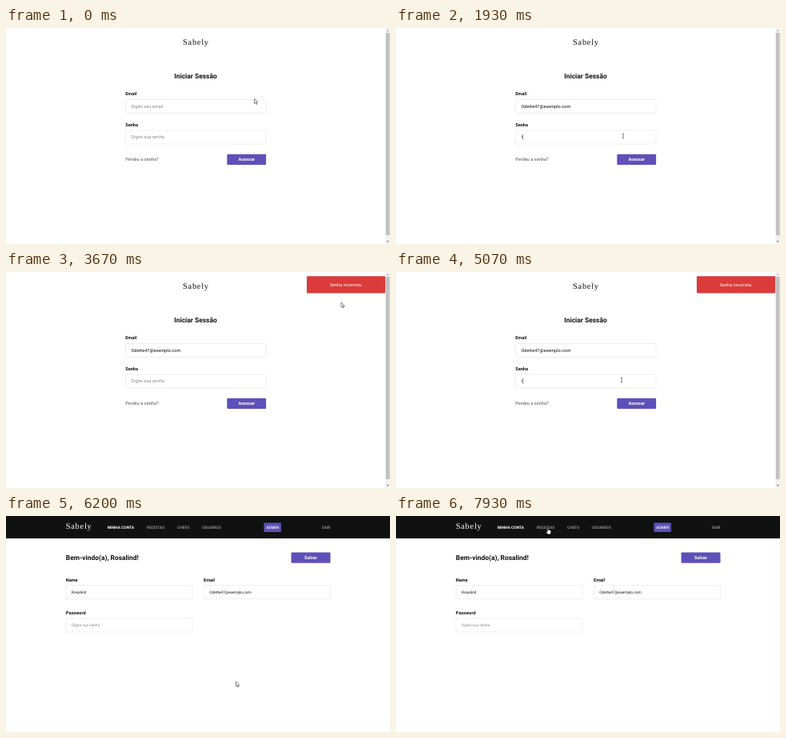
An HTML page that plays this animation: 480 by 270 pixels, repeating every 8000 ms.

```html
<!DOCTYPE html>
<html lang="pt-BR">
<head>
<meta charset="utf-8">
<title>Iniciar Sessão</title>
<style>
  html, body { margin: 0; width: 100%; height: 100%; overflow: hidden; background: #fff; }
  svg { display: block; width: 480px; height: 270px; }
  text { font: 5.62px Roboto, Arial, sans-serif; fill: #111; text-rendering: geometricPrecision; white-space: pre; }
  .title { font-size: 8.43px; font-weight: 700; }
  .bold { font-weight: 700; }
  .mid { text-anchor: middle; }
  .white { fill: #fff; }
  .hint { fill: #8a8a8a; }
  .nav { font-size: 4.92px; font-weight: 700; fill: #8d8d8d; }
  .nav.white { fill: #fff; }
  .small { font-size: 4.75px; }
  .logo { font: 10.4px "Liberation Serif", "Times New Roman", serif; letter-spacing: .75px; }
  .field { fill: #fff; stroke: #dcdcdc; stroke-width: .5; }
  .btn { fill: #5e50b9; }
  .btn.hover { fill: #796bd4; }
</style>
</head>
<body>
<svg viewBox="0 0 480 270">
  <g id="login">
    <text class="logo" x="221" y="21">Sabely</text>
    <text class="title mid" x="237" y="63">Iniciar Sessão</text>
    <text class="bold" x="149.2" y="84.4">Email</text>
    <rect class="field" x="149.5" y="89.5" width="175.5" height="17" rx="1.4"/>
    <text id="email" x="156.5" y="99.8"></text>
    <text class="bold" x="149.2" y="123.2">Senha</text>
    <rect class="field" x="149.5" y="128" width="175.5" height="17" rx="1.4"/>
    <text id="pass" x="156.5" y="138.4"></text>
    <rect id="caret" y="0" width=".5" height="6.6" fill="#111"/>
    <text x="149.2" y="166.2" style="fill:#777;font-weight:500">Perdeu a senha?</text>
    <rect id="enter" class="btn" x="276.3" y="157.8" width="48.8" height="13.2" rx="1.2"/>
    <text class="bold white mid" x="300.7" y="166.3">Acessar</text>
    <g id="toast">
      <rect x="375.6" y="5.4" width="99" height="21.8" rx="1.2" fill="#000" opacity=".15"/>
      <rect x="376" y="5.2" width="98.2" height="21" rx="1" fill="#db3b3b"/>
      <text class="white mid" x="425" y="17.8">Senha incorreta.</text>
    </g>
    <rect x="474.4" width="5.6" height="270" fill="#f1f1f1"/>
    <rect x="474.8" y="6" width="4.8" height="253" fill="#c1c1c1"/>
    <path d="M475.9 4l1.3-1.6 1.3 1.6z" fill="#888"/>
    <path d="M475.9 266l1.3 1.6 1.3-1.6z" fill="#444"/>
  </g>

  <g id="account">
    <rect width="480" height="28" fill="#111"/>
    <text class="logo white" x="74.7" y="16">Sabely</text>
    <text class="nav white" x="126.8" y="15.5">MINHA CONTA</text>
    <text class="nav" x="176" y="15.5">RECEITAS</text>
    <text class="nav" x="214" y="15.5">CHEFS</text>
    <text class="nav" x="245" y="15.5">USUÁRIOS</text>
    <rect class="btn" x="322.3" y="8.4" width="21.6" height="11.6" rx="1"/>
    <text class="nav white mid" x="333.1" y="16" style="font-weight:500">ADMIN</text>
    <text class="nav" x="394.5" y="16">SAIR</text>
    <text class="title" x="74.8" y="55">Bem-vindo(a), Rosalind!</text>
    <rect class="btn" x="356.5" y="45.6" width="49" height="13.2" rx="1.2"/>
    <text class="bold white mid" x="381" y="54.2">Salvar</text>
    <text class="bold" x="74.8" y="81.6">Name</text>
    <rect class="field" x="75" y="86.7" width="158" height="17" rx=".8"/>
    <text class="small" x="82" y="96.8">Rosalind</text>
    <text class="bold" x="247" y="81.6">Email</text>
    <rect class="field" x="247.3" y="86.7" width="158" height="17" rx=".8"/>
    <text class="small" x="254.2" y="96.8">Odette47@exemplo.com</text>
    <text class="bold" x="74.8" y="123.2">Password</text>
    <rect class="field" x="75" y="128" width="158" height="17" rx=".8"/>
    <text class="small hint" x="82" y="138.2">Digite sua senha</text>
  </g>

  <g id="cursor" stroke-linejoin="round">
    <path id="arrow" d="M0 0V6L1.4 4.8 2.4 7 3.4 6.5 2.5 4.4H4.2Z" fill="#fff" stroke="#222" stroke-width=".55"/>
    <path id="hand" d="M-.6 .4Q0-.4 .6 .4V3Q1.2 2.6 1.7 3.2 2.4 2.9 2.8 3.5 3.6 3.4 3.6 4.2V6Q3.5 7.2 2.8 8.2H-.5Q-1.5 6.6-2.3 5.2-2.2 4-.6 5.2Z" fill="#fff" stroke="#222" stroke-width=".55"/>
    <path id="beam" d="M-1.1-2.8H-.4L0-2.5 .4-2.8H1.1M0-2.5V2.5M-1.1 2.8H-.4L0 2.5 .4 2.8H1.1" fill="none" stroke="#222" stroke-width=".6"/>
  </g>
</svg>
<script>
const LOOP = 8000, FAILED = 3130, SIGNED_IN = 6130;
const $ = id => document.getElementById(id);
const show = (id, on) => { $(id).style.display = on ? '' : 'none'; };

// cursor path: time, x, y
const path = [
  [0, 310.5, 88.5], [70, 310.5, 88.5], [450, 302, 98], [870, 294, 108], [930, 293, 109],
  [1130, 277, 114], [1530, 284, 135], [2500, 284, 135], [2740, 304, 170.3], [3070, 304, 170.3],
  [3200, 308, 158], [3670, 419, 38], [4070, 419, 38], [4730, 282, 135], [5500, 282, 135],
  [5780, 303, 167], [5950, 303, 168], [6070, 300, 182], [6200, 287.5, 207], [6470, 270.5, 216.5],
  [6670, 270.5, 216.5], [7470, 187, 58], [7530, 187, 56], [7870, 190, 14.5], [8000, 190, 14.5]
];
const keyTimes = [1930, 2200, 2400, 2530, 5070, 5270, 5400, 5530];

function cursorAt(t) {
  const i = path.findIndex(p => p[0] > t);
  const [t0, x0, y0] = path[i - 1], [t1, x1, y1] = path[i];
  const k = (t - t0) / (t1 - t0);
  return [x0 + (x1 - x0) * k, y0 + (y1 - y0) * k];
}

function setField(id, value, hint) {
  $(id).textContent = value || hint;
  $(id).setAttribute('class', value ? '' : 'hint');
}

function setCaret(id, value) {
  show('caret', id);
  if (!id) return;
  const width = value ? $(id).getComputedTextLength() : 0;
  $('caret').setAttribute('x', 156.6 + width);
  $('caret').setAttribute('y', id === 'email' ? 94.5 : 133);
}

function drawLogin(t, overButton) {
  const start = t < FAILED ? 0 : FAILED;
  const email = t < 930 ? '' : 'Odette47@exemplo.com';
  const pass = '•'.repeat(keyTimes.filter(k => k >= start && k <= t).length);
  setField('email', email, 'Digite seu email');
  setField('pass', pass, 'Digite sua senha');
  const inPass = t >= 1530 && t < FAILED || t >= 4730;
  const inEmail = t >= 500 && t < 1530;
  setCaret(inPass ? 'pass' : inEmail ? 'email' : '', inPass ? pass : email);
  $('enter').classList.toggle('hover', overButton);
  show('toast', t >= FAILED);
}

function draw(t) {
  const signedIn = t >= SIGNED_IN;
  const [x, y] = cursorAt(t);
  const within = (l, top, r, b) => x >= l && x <= r && y >= top && y <= b;
  const overButton = !signedIn && within(276, 158, 325, 171);
  const overLink = signedIn && within(176, 10, 198, 18);
  const overField = signedIn
    ? within(75, 87, 233, 104) || within(75, 128, 233, 145)
    : within(149, 89, 325, 107) || within(149, 128, 325, 145);

  show('login', !signedIn);
  show('account', signedIn);
  if (!signedIn) drawLogin(t, overButton);

  const shape = overButton || overLink ? 'hand' : overField ? 'beam' : 'arrow';
  for (const id of ['arrow', 'hand', 'beam']) show(id, id === shape);
  $('cursor').setAttribute('transform', `translate(${x} ${y})`);
}

const begin = performance.now();
function tick() {
  draw((performance.now() - begin) % LOOP);
  requestAnimationFrame(tick);
}
tick();
</script>
</body>
</html>
```
